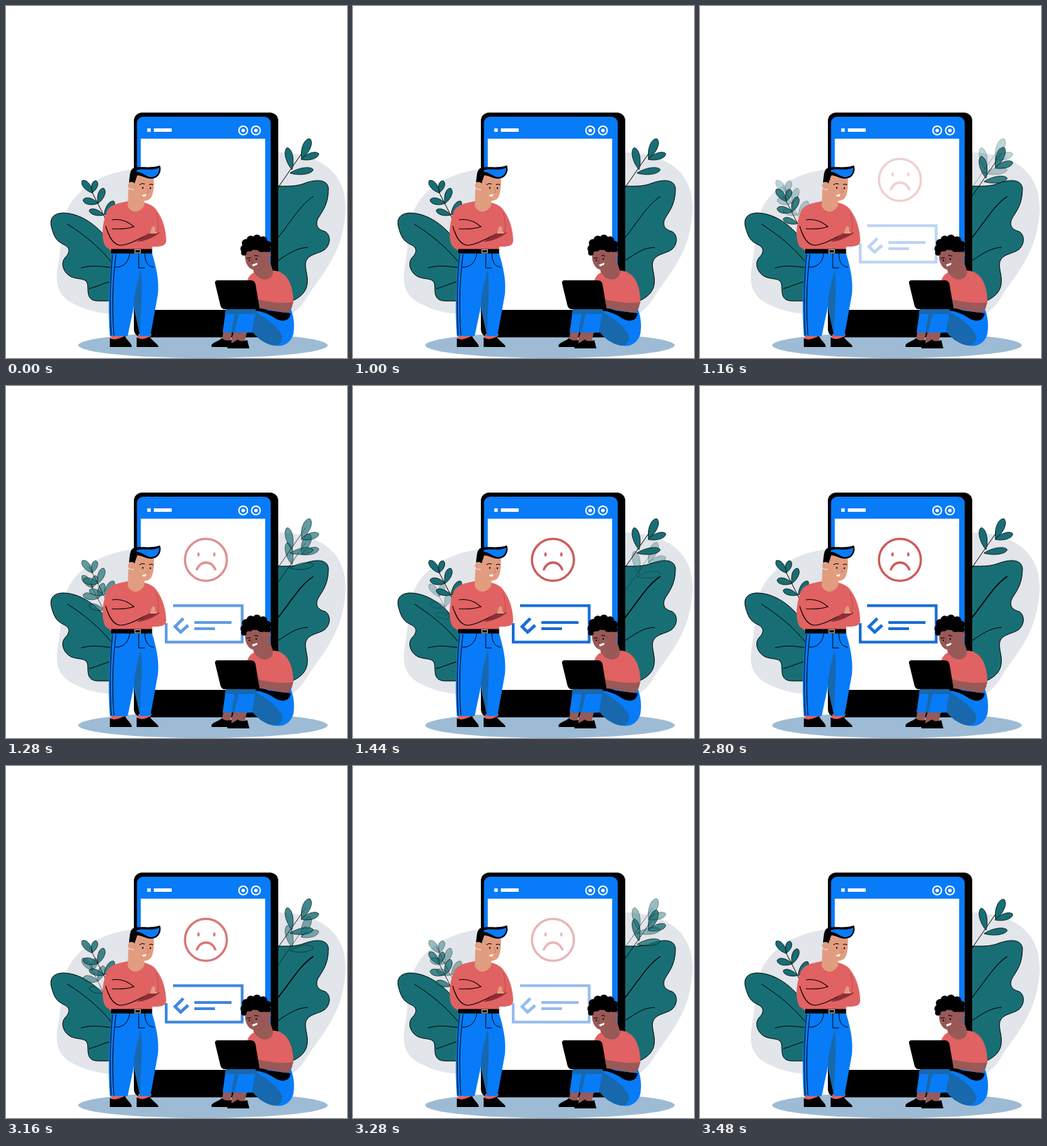
An HTML page with a canvas that plays this animation: 496x512 px, repeating every 3.52 s.

```html
<!DOCTYPE html>
<html lang="en">
<head>
<meta charset="utf-8">
<title>Waiting team</title>
<style>
html, body { margin: 0; width: 100%; height: 100%; overflow: hidden; background: #fff; }
canvas { display: block; width: 496px; height: 512px; }
</style>
</head>
<body>
<canvas id="stage" width="496" height="512"></canvas>
<script>
const ctx = document.getElementById('stage').getContext('2d');
const LOOP = 3520, STEP = 40;
const BLUE = '#087bf8', SHADE = '#1768ad', TEAL = '#176f75', CORAL = '#e16262',
      SKIN = '#e29c80', BROWN = '#985957', INK = '#000', WHITE = '#fff';

const clamp = v => Math.max(0, Math.min(1, v));
const smooth = v => { v = clamp(v); return v * v * (3 - 2 * v); };

function fill(d, color) {
  ctx.fillStyle = color;
  ctx.fill(new Path2D(d));
}
function line(d, width = 1, color = INK) {
  ctx.strokeStyle = color;
  ctx.lineWidth = width;
  ctx.stroke(new Path2D(d));
}
function shape(d, color, width = 1) {
  fill(d, color);
  line(d, width);
}
function rect(x, y, w, h, color) {
  ctx.fillStyle = color;
  ctx.fillRect(x, y, w, h);
}
function oval(x, y, rx, ry, color) {
  ctx.beginPath();
  ctx.ellipse(x, y, rx, ry, 0, 0, Math.PI * 2);
  ctx.fillStyle = color;
  ctx.fill();
}
function ring(x, y, r, width, color) {
  ctx.beginPath();
  ctx.arc(x, y, r, 0, Math.PI * 2);
  ctx.strokeStyle = color;
  ctx.lineWidth = width;
  ctx.stroke();
}

// A small leaf from base to tip, fuller near the tip.
function leaflet(bx, by, tx, ty, w) {
  const dx = tx - bx, dy = ty - by, len = Math.hypot(dx, dy);
  const nx = -dy / len * w * .65, ny = dx / len * w * .65;
  const at = (k, s) => `${bx + dx * k + nx * s},${by + dy * k + ny * s}`;
  shape(`M${bx},${by}C${at(.35, 1)} ${at(.9, 1.15)} ${tx},${ty}C${at(.9, -1.15)} ${at(.35, -1)} ${bx},${by}Z`, TEAL, .8);
}

const leaflets = [
  [416, 238, 409, 206, 10], [430, 222, 442, 193, 11], [429, 223, 455, 215, 9], [413, 243, 447, 238, 9],
  [126, 272, 111, 254, 9], [126, 271, 131, 254, 8], [134, 287, 112, 282, 9],
  [134, 287, 142, 265, 9], [142, 304, 121, 297, 8], [143, 304, 157, 284, 9]
];

function twigs(dy, alpha) {
  if (alpha <= 0) return;
  ctx.save();
  ctx.globalAlpha = alpha;
  ctx.translate(0, dy);
  line('M395,265L436,206M121,263Q132,284 150,320');
  leaflets.forEach(l => leaflet(...l));
  ctx.restore();
}

function backdrop(u) {
  fill('M190,237C130,242 91,276 85,310C80,336 79,360 75,381C71,408 78,423 100,434C132,450 160,449 190,447L390,455C420,452 430,437 442,417C461,389 487,361 493,309C500,257 474,216 398,213Z', '#e2e5ea');
  oval(286.5, 493.5, 181.5, 18.5, '#9dbbd4');
  shape('M156,353C141,325 113,302 84,301C69,301 63,309 66,321C70,337 74,342 84,347C95,352 92,360 86,366C79,374 83,388 95,394C108,399 119,394 119,409C119,422 121,429 135,429H156Z', TEAL);
  line('M89,317C114,333 135,350 153,372M109,381C122,377 137,378 156,381M121,411C131,409 141,403 156,400');
  shape('M390,262C409,262 421,263 434,258C447,253 467,250 469,265C469,285 463,295 455,307C449,317 452,325 464,328C473,333 472,347 464,354C455,361 440,360 436,372C434,383 440,392 438,405C436,418 425,430 390,437Z', TEAL);
  line('M390,344C414,315 427,290 447,277', 1 + .6 * u);
  line('M390,374C409,362 420,352 439,351');
}

function phone() {
  ctx.fillStyle = INK;
  ctx.beginPath();
  ctx.roundRect(186, 155, 210, 327, 12);
  ctx.fill();
  ctx.fillStyle = BLUE;
  ctx.beginPath();
  ctx.roundRect(190.5, 161, 194.5, 281, [9, 9, 0, 0]);
  ctx.fill();
  rect(196, 193, 181, 249, WHITE);
  rect(205.5, 178, 5, 5, WHITE);
  rect(215, 178, 26, 5, WHITE);
  for (const x of [345, 363.5]) {
    ring(x, 181, 6.3, 1.9, WHITE);
    oval(x, 181, 2.6, 2.6, WHITE);
  }
}

function message(alpha) {
  if (alpha <= 0) return;
  const red = '#cf5a5b', blue = '#176cd9';
  ctx.save();
  ctx.globalAlpha = alpha;
  ring(290.8, 252.8, 30.5, 3.3, red);
  oval(280, 245, 1.7, 3, red);
  oval(303, 245, 1.7, 3, red);
  line('M277,268C283,253 299,253 305,268', 3.3, red);
  line('M243,319.5H343.5V372.5H233V345', 4, blue);
  line('M258,338L246,350L254,358L265,348', 4.5, blue);
  line('M274,344H328M274,353H304', 4, blue);
  ctx.restore();
}

function man() {
  // shoes and ankles
  fill('M152,477H176L173,486H153ZM193,477H212L208,485H191Z', CORAL);
  fill('M151,483C159,488 167,482 173,480C176,487 183,490 183,496H151ZM190,482C198,487 204,483 209,481C213,488 221,491 222,496H190Z', INK);
  // trousers
  fill('M154,358H212C219,381 223,400 221,419L210,480H195L186,437L177,480H151C148,440 150,396 154,358Z', BLUE);
  fill('M196,384C190,405 186,423 186,439L195,480C195,446 200,414 196,384Z', SHADE);
  line('M155,361C151,400 151,440 153,479M160,361C155,400 154,440 157,479M180,360C178,374 170,380 159,380M193,360V381H202M202,360C202,373 207,379 215,380');
  // shirt and neck
  fill('M177,284C161,287 149,290 146,301C140,316 138,339 145,350L153,356H212L213,350C224,350 232,350 233,342C233,326 228,309 219,297C214,290 208,288 201,286Z', CORAL);
  fill('M178,266L177,291C182,302 195,302 201,290L202,272Z', SKIN);
  line('M154,324C168,325 177,324 186,321C177,313 166,309 154,311M145,320C150,337 156,347 166,348C178,348 190,340 212,330', 1.1);
  line('M218,301C222,311 223,322 220,330', .7, '#ad4248');
  fill('M190,343C199,336 207,331 214,327L224,330C215,336 204,342 190,343Z', '#8d2e37');
  fill('M209,331C211,328 211,322 214,320L217,322L217,328C222,328 222,331 217,331Z', SKIN);
  // head
  fill('M186,248C198,244 208,247 215,251C216,264 214,280 207,282C199,285 190,284 184,274L186,266C180,267 176,264 178,259C180,255 184,256 186,258Z', SKIN);
  fill('M179,257C180,247 180,239 185,236C196,232 208,237 224,232C227,241 222,250 213,251C205,252 199,247 191,246L187,258C185,256 182,255 179,257Z', INK);
  fill('M190,239C202,235 211,241 223,235C223,244 218,249 211,249C203,248 199,242 190,241Z', BLUE);
  oval(199, 264.5, 1, 1.3, INK);
  oval(210, 265, 1, 1.3, INK);
  line('M194,260Q198,257 202,259M208,260Q211,258 214,260', 1);
  line('M206,265L208,271L204,271', .6, '#b96f59');
  fill('M198,275L204,273.5L203,277H199Z', WHITE);
  // belt
  rect(153, 353.5, 59.5, 6.5, INK);
  ctx.strokeStyle = '#c6b49d';
  ctx.lineWidth = 1.2;
  ctx.strokeRect(187.5, 354.5, 8, 4.5);
}

function sitter() {
  // shoes and ankles
  fill('M316,474H329L326,488H314ZM331,475H350L347,490H326Z', BROWN);
  fill('M299,493C303,488 309,488 314,483C318,488 324,486 328,486V496H299ZM322,495C326,490 333,489 337,485C341,489 347,487 351,486L354,498H322Z', INK);
  // legs
  fill('M320,440H374L360,475H315Z', BLUE);
  fill('M333,445L328,475H332L339,446Z', SHADE);
  fill('M351,440H414C419,452 420,465 418,477C414,491 403,496 391,494C376,492 363,481 358,472L350,476Z', BLUE);
  fill('M363,445C374,452 392,462 401,478C404,486 399,493 391,494C376,492 364,482 358,473Z', SHADE);
  fill('M320,441H368L362,448H318Z', SHADE);
  // shirt
  fill('M351,399C354,390 362,385 371,385H391C407,387 418,402 418,432L410,445L366,428Z', CORAL);
  fill('M360,378V386C364,394 372,400 381,397C388,395 389,388 388,384L382,366L368,372Z', BROWN);
  // arm and its shadow
  fill('M363,436L382,443L414,447C413,458 402,461 391,454C379,446 370,444 363,443Z', INK);
  fill('M363,426C384,431 402,433 417,431C417,441 412,447 405,446C391,444 375,439 363,440Z', BROWN);
  // laptop
  fill('M308,399H355C360,399 362,401 363,405L369,441H318C315,441 313,439 312,436L304,403C304,400 305,399 308,399Z', INK);
  // head
  fill('M348,355C354,347 374,347 380,358C388,357 387,367 380,369C378,379 371,385 361,384C351,382 346,371 348,355Z', BROWN);
  const curls = [[347, 353, 6], [349, 345, 6], [356, 340, 6], [365, 339, 6.5], [374, 341, 6], [380, 347, 5.5], [380, 354, 5], [363, 347, 8], [372, 350, 8], [354, 350, 7], [346, 359, 4]];
  for (const [x, y, r] of curls) oval(x, y, r, r, INK);
  oval(380, 363, 4.8, 5.5, BROWN);
  oval(354, 370, 1, 1.3, INK);
  oval(364, 368, 1, 1.3, INK);
  line('M350,367L356,366M361,363Q364,362 367,364', 1);
  line('M358,367L357,374L360,374', .6, '#693737');
  fill('M358,376L366,373.5L365,376.5L359,379Z', WHITE);
}

function draw(t) {
  // progress runs forward into the message state, then back
  const u = Math.max(0, Math.min(800, t - 1000, 3490 - t));
  const shown = smooth(u / 450);
  ctx.clearRect(0, 0, 496, 512);
  backdrop(shown);
  twigs(.078 * u, 1 - smooth(u / 700));
  twigs(0, shown);
  phone();
  message(shown);
  man();
  sitter();
}

const start = performance.now();
function tick() {
  const t = (performance.now() - start) % LOOP;
  draw(Math.floor(t / STEP) * STEP);
  requestAnimationFrame(tick);
}
tick();
</script>
</body>
</html>
```
